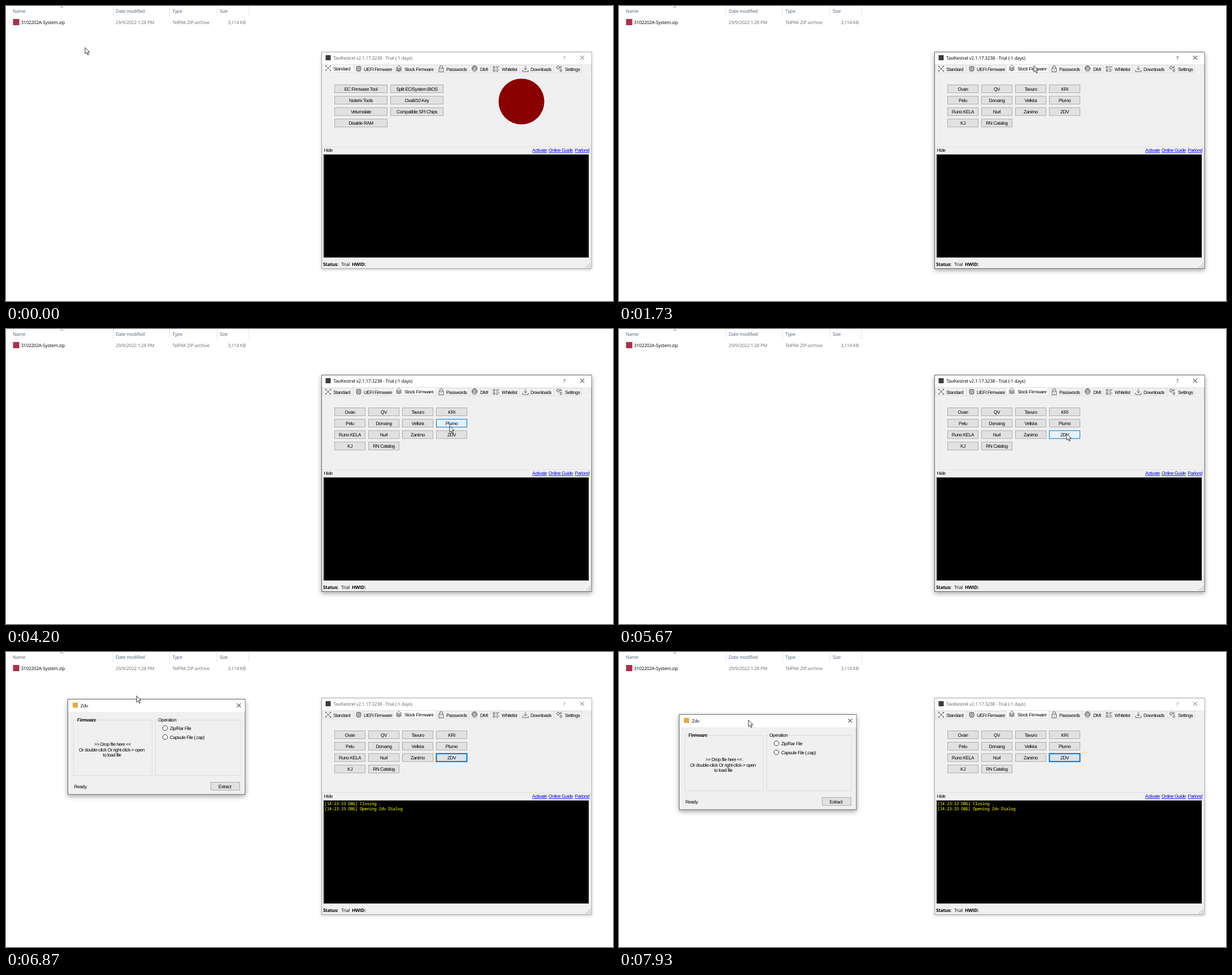
Write an HTML page that moves like this. It is 1074 by 522 pixels and loops after 8 s.

```html
<!DOCTYPE html>
<html lang="en">
<head>
<meta charset="utf-8">
<title>Firmware tool</title>
<style>
html, body { margin: 0; width: 100%; height: 100%; overflow: hidden; background: #fff; }
svg { display: block; }
text { font: 8.3px "Liberation Sans", Arial, sans-serif; letter-spacing: -.45px; fill: #000; white-space: pre; text-rendering: geometricPrecision; }
.ui { font: 8.2px "Open Sans", "Noto Sans", sans-serif; letter-spacing: -.2px; }
.log { font: 500 7.6px "Noto Sans Mono", "DejaVu Sans Mono", monospace; letter-spacing: -.38px; fill: #ffff00; }
.bold { font-weight: 700; }
.head { fill: #4c607a; }
.dim { fill: #6d6d6d; }
.link { fill: #0000ff; text-decoration: underline; }
.mid { text-anchor: middle; }
.end { text-anchor: end; }
.btn rect { fill: #e1e1e1; stroke: #adadad; }
.btn.focus rect { stroke: #0078d7; stroke-width: 2; }
.btn.hover rect { fill: #e5f1fb; stroke: #0078d7; }
.btn.down rect { fill: #cce4f7; stroke: #005499; }
.tab rect { fill: #f0f0f0; stroke: #dedede; }
.tab.hover rect { fill: #d8eaf9; }
.tab.on rect { fill: #fff; }
.icon { fill: none; stroke: #333; stroke-width: .75; }
.line { fill: none; stroke: #000; }
</style>
</head>
<body>
<svg id="stage" width="1074" height="522" viewBox="0 0 1074 522">
  <defs>
    <filter id="soft" x="-10%" y="-10%" width="120%" height="125%">
      <feDropShadow dx="0" dy="1.5" stdDeviation="2.5" flood-color="#000" flood-opacity=".22"/>
    </filter>
    <filter id="deep" x="-10%" y="-10%" width="120%" height="125%">
      <feDropShadow dx="0" dy="3" stdDeviation="4" flood-color="#000" flood-opacity=".36"/>
    </filter>
  </defs>
  <g id="files"></g>
  <g id="app"></g>
  <g id="dialog"></g>
  <path id="cursor" d="M0 .5V11.8L2.6 9.4 4.6 13.6 6.4 12.8 4.5 8.7H8Z" fill="#fff" stroke="#000" stroke-width=".8"/>
</svg>
<script>
const TICK = 1000 / 15, LOOP = 8000;
const $ = id => document.getElementById(id);

const text = (x, y, str, cls = '') =>
  `<text x="${x}" y="${y}" class="${cls}">${str.replace(/</g, '&lt;').replace(/>/g, '&gt;')}</text>`;
const box = (x, y, w, h, fill, stroke = 'none', extra = '') =>
  `<rect x="${x}" y="${y}" width="${w}" height="${h}" fill="${fill}" stroke="${stroke}" ${extra}/>`;
const path = (d, cls = 'line', extra = '') => `<path d="${d}" class="${cls}" ${extra}/>`;
const cross = (x, y) => path(`M${x - 3.5} ${y - 3.5}l7 7m0 -7l-7 7`);

const buttons = [];
function button(x, y, w, label, view) {
  const id = 'b' + buttons.length;
  buttons.push({ id, x, y, w, h: 14, view, label });
  return `<g id="${id}" class="btn">${box(x, y, w, 14)}${text(x + w / 2, y + 10, label, 'mid')}</g>`;
}
const rowY = i => 139.5 + 20.17 * i;
const grid = (columns, x, pitch, w, view) => columns.map((labels, c) =>
  labels.map((s, r) => button(x + pitch * c, rowY(r), w, s, view)).join('')).join('');

// Icons are drawn around their own centre.
const tabs = [
  ['Standard', 560, 614, 570, 579, 'M-5 -5L5 5M-5 -3L-3 -5M3 5L5 3M5 -5L-5 5M3 -5L5 -3M-5 3L-3 5'],
  ['UEFI Firmware', 614, 685, 624, 633, 'M-3.5 -3.5h7v7h-7zM-1.5 -1.5h3v3h-3zM-2 -5v1.5M0 -5v1.5M2 -5v1.5M-2 3.5v1.5M0 3.5v1.5M2 3.5v1.5M-5 -2h1.5M-5 1h1.5M3.5 -2h1.5M3.5 1h1.5'],
  ['Stock Firmware', 685, 760, 695, 705, 'M-5 -1L0 -5.5 5 -1M-3 -2.5v6h6v-6M-1.5 -1h3v3h-3zM-5.5 1h2.5M3 1h2.5M-5.5 4.5L-3 2.5M5.5 4.5L3 2.5M-1 3.5v2M1 3.5v2'],
  ['Passwords', 760, 819, 770, 779, 'M-4 -1h8v6.5h-8zM-2.5 -1v-2a2.5 2.5 0 0 1 5 0v2M0 1.2v2'],
  ['DMI', 819, 857, 829, 839, 'M-4 3V-1a4 4 0 0 1 8 0v4M-2.2 5v-6a2.2 2.2 0 0 1 4.4 0v6M0 -1.5v7M-3 -4.2a5 5 0 0 1 6 0M-4.5 -2.5v3M4.5 -2.5v3'],
  ['Whitelist', 857, 908, 867, 877, 'M-5 -4h3v3h-3zM-5 1.5h3v3h-3zM0 -3.5h6M0 -1h4M0 2h6M0 4.5h4'],
  ['Downloads', 908, 969, 919, 928, 'M0 -5v7M-3 -1L0 2.2 3 -1M-5 2v3h10v-3'],
  ['Settings', 969, 1018, 979, 989, 'M-4.5 -2a2.3 2.3 0 1 0 4.6 0a2.3 2.3 0 1 0 -4.6 0M1 3a1.8 1.8 0 1 0 3.6 0a1.8 1.8 0 1 0 -3.6 0M1.3 -2.8a1.3 1.3 0 1 0 2.6 0a1.3 1.3 0 1 0 -2.6 0M-2.2 -5.5v1.2M-2.2 .3v1.2M-5.7 -2h1.2M.1 -2h1.2M2.8 .2v1M2.8 4.8v1']
];
const tabMarkup = tabs.map(([label, x0, x1, ix, tx, d], i) =>
  `<g id="t${i}" class="tab">${box(x0 + .5, 104.5, x1 - x0, 13.5)}` +
  path(d, 'icon', `transform="translate(${ix} 111)"`) + text(tx, 114.5, label) + '</g>').join('');

$('files').innerHTML =
  [189.5, 289.5, 373.5, 429.5].map(x => path(`M${x} 0V18`, '', 'stroke="#e5e5e5"')).join('') +
  path('M96 3.2L98.7 .6 101.4 3.2', '', 'fill="none" stroke="#777"') +
  [[12, 'Name'], [194, 'Date modified'], [294.5, 'Type'], [378, 'Size']]
    .map(([x, s]) => text(x, 12, s, 'ui head')).join('') +
  box(12.5, 23, 11, 11, '#a8324a') +
  text(26.5, 32, '3102202A-System.zip', 'ui') +
  text(194, 32, '29/9/2022 1:28 PM', 'ui dim') +
  text(294.5, 32, 'TelPAK ZIP archive', 'ui dim') +
  text(424, 32, '3,114 KB', 'ui dim end');

const gripDots = [[6, 0], [3, 3], [6, 3], [0, 6], [3, 6], [6, 6]]
  .map(([x, y]) => box(1026.5 + x, 455 + y, 1.5, 1.5, '#a8a8a8')).join('');

// Sunken edge: dark on the top and left, light on the bottom and right.
const consoleBox =
  box(561, 262, 471, 184, '#e3e3e3') + box(561, 262, 470, 183, '#a0a0a0') +
  box(562, 263, 469, 182, '#000') + path('M562.5 445V263', '', 'stroke="#696969"');

$('app').innerHTML =
  box(558.5, 81.5, 477.5, 383, '#f0f0f0', '#aaa', 'id="frame"') +
  box(559, 82, 476.5, 21, '#fff') +
  box(565.5, 87, 9, 9, '#3c3c3c') +
  `<g id="caption">${text(579, 95, 'TaviKestrel v2.1.17.3238 - Trial (-1 days)', 'ui')}` +
  text(988, 95, '?', 'ui mid') + cross(1019.5, 91.5) + '</g>' +
  box(560.5, 118, 474, 129.5, '#f0f0f0', '#fafafa') + tabMarkup +
  '<g id="tools">' +
  grid([['EC Firmware Tool', 'Noterix Tools', 'Velumslate', 'Disable RAM'],
        ['Split EC/System BIOS', 'Ova8/10 Key', 'Compatible SPI Chips']], 581.5, 99, 93, 'tools') +
  '<circle cx="912" cy="169" r="40.5" fill="#8b0000"/></g>' +
  '<g id="makers">' +
  grid([['Ovan', 'Pelu', 'Runo KELA', 'KJ'], ['QV', 'Dorvang', 'Nurl', 'RN Catalog'],
        ['Tavuro', 'Velkira', 'Zanimo'], ['KRI', 'Plumo', 'ZDV']], 581.5, 60, 54, 'makers') + '</g>' +
  path('M559 248.5H1035', '', 'stroke="#dcdcdc"') +
  text(562.5, 258, 'Hide') + text(957, 258, 'Activate', 'link end') +
  text(1003, 258, 'Online Guide', 'link end') + text(1032, 258, 'Parlond', 'link end') +
  consoleBox +
  '<g id="log">' + text(563.5, 271, '[14:23:33 DBG] Closing .', 'log') +
  text(563.5, 280, '[14:23:33 DBG] Opening Zdv Dialog', 'log') + '</g>' +
  text(561, 460, 'Status:', 'ui bold') + text(593, 460, 'Trial', 'ui') +
  text(612, 460, 'HWID:', 'ui bold') + gripDots;

const radio = (y, label) =>
  `<circle cx="281.5" cy="${y}" r="4.3" fill="#fff" stroke="#333"/>` + text(290, y + 3, label);

$('dialog').innerHTML =
  box(109.5, 83.5, 313.5, 168.5, '#f0f0f0', '#6a6a6a', 'filter="url(#deep)"') +
  box(110, 84, 312.5, 22, '#fff') + box(118, 89.5, 9, 9, '#e5a93c') +
  text(132, 97.5, 'Zdv', 'ui') + cross(412, 94.5) +
  text(126, 123, 'Firmware', 'bold') +
  box(119.5, 120.5, 139, 98, 'none', '#dcdcdc') + path('M126 120.5H159', 'line', 'stroke-opacity=".45"') +
  box(264.5, 120.5, 150, 98, 'none', '#dcdcdc') + box(267, 118, 36, 6, '#f0f0f0') +
  text(269, 123, 'Operation') + radio(134.5, 'Zip/Rar File') + radio(150.5, 'Capsule File (.cap)') +
  text(188.5, 166, '>> Drop file here <<', 'mid') +
  text(187, 175.5, 'Or double-click Or right-click-> open', 'mid') +
  text(187.5, 184.5, 'to load file', 'mid') +
  text(120.5, 241, 'Ready.') +
  `<g class="btn">${box(362.5, 230.5, 51, 14)}${text(387, 241, 'Extract', 'mid')}</g>`;

// Pointer route: tick, x, y
const route = [
  [8, 140, 73], [9, 150, 69], [10, 182, 63], [12, 310, 53], [13, 400, 52], [15, 545, 61],
  [17, 650, 79], [19, 716, 96], [20, 728, 101], [21, 734, 105],
  [52, 734, 105], [53, 735, 107], [56, 740, 140], [59, 757, 162], [61, 774, 168], [63, 785, 171],
  [65, 784, 173], [66, 784, 176], [67, 786, 180], [69, 790, 186],
  [77, 790, 186], [78, 812, 150], [79, 790, 117], [80, 745, 122], [81, 723, 177],
  [82, 745, 225], [83, 800, 242], [84, 852, 205], [85, 792, 185],
  [98, 792, 185], [99, 760, 170], [100, 650, 125], [101, 470, 90], [102, 320, 78], [103, 231, 77],
  [104, 217, 72], [106, 216, 76], [108, 222, 86], [111, 232, 93], [119, 229, 120]
];
const ease = p => p * p * (3 - 2 * p);
const clamp = p => Math.min(1, Math.max(0, p));
const drag = n => ease(clamp((n - 111) / 8));

function pointer(n) {
  const i = route.findIndex(p => p[0] >= n);
  if (i < 0) return route.at(-1).slice(1);
  if (i === 0) return route[0].slice(1);
  const [t0, x0, y0] = route[i - 1], [t1, x1, y1] = route[i];
  const p = t0 === 111 ? drag(n) : (n - t0) / (t1 - t0);
  return [x0 + (x1 - x0) * p, y0 + (y1 - y0) * p];
}

const show = (id, on) => { $(id).style.display = on ? '' : 'none'; };
const inside = (x, y, b) => x >= b.x && x <= b.x + b.w && y >= b.y && y <= b.y + b.h;

function draw(n) {
  const [x, y] = pointer(n);
  const active = n >= 25 && n < 91;
  const view = n >= 26 ? 'makers' : 'tools';
  const selected = view === 'makers' ? 2 : 0;

  $('cursor').setAttribute('transform', `translate(${x} ${y})`);
  $('frame').setAttribute('stroke', active ? '#6a6a6a' : '#aaa');
  $('frame').setAttribute('filter', `url(#${active ? 'deep' : 'soft'})`);
  $('caption').setAttribute('opacity', active ? 1 : .6);
  show('tools', view === 'tools');
  show('makers', view === 'makers');
  show('log', n >= 91);

  tabs.forEach(([, x0, x1], i) => {
    const tab = $('t' + i), on = i === selected;
    const hover = !on && inside(x, y, { x: x0, y: 104, w: x1 - x0, h: 14 });
    tab.setAttribute('class', 'tab' + (on ? ' on' : hover ? ' hover' : ''));
    tab.setAttribute('transform', `translate(0 ${on ? -1 : 0})`);
  });
  for (const b of buttons) {
    const last = b.label === 'ZDV';
    const cls = ['btn'];
    if (last && n >= 88) cls.push('focus');
    if (b.view === view && inside(x, y, b)) cls.push('hover');
    if (last && n === 88) cls.push('down');
    $(b.id).setAttribute('class', cls.join(' '));
  }

  const open = clamp((n - 90) / 6), size = .92 + .08 * ease(open), d = drag(n);
  show('dialog', open > 0);
  $('dialog').setAttribute('opacity', ease(open));
  $('dialog').setAttribute('transform',
    `translate(${266 - 3 * d} ${168 + 27 * d}) scale(${size}) translate(-266 -168)`);
}

let shown = -1;
function loop() {
  const n = Math.floor((performance.now() % LOOP + 5) / TICK) % 120;
  if (n !== shown) draw(shown = n);
  requestAnimationFrame(loop);
}
loop();
</script>
</body>
</html>
```
